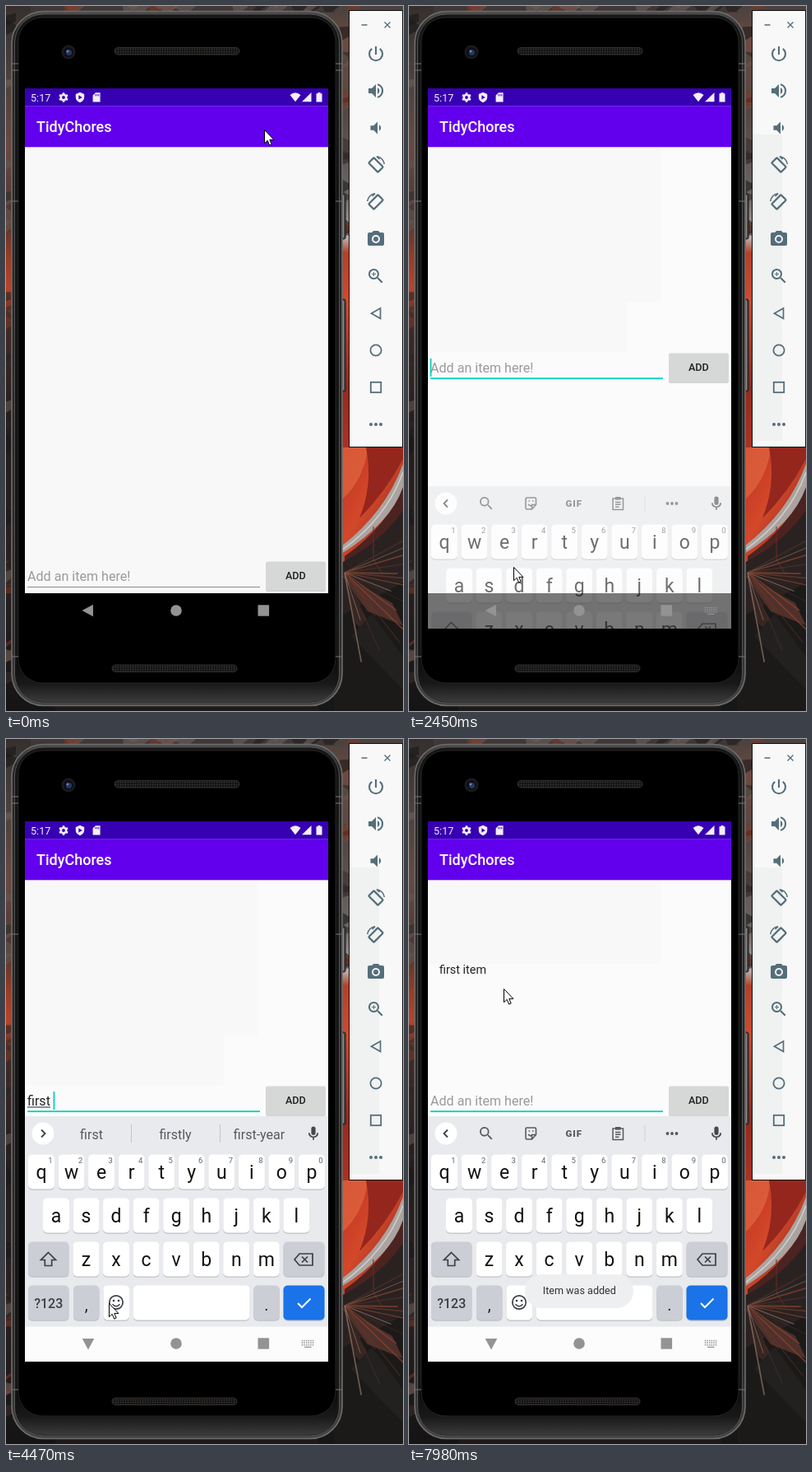
An HTML page for the animation above (8 s loop, 483 px wide and 856 px high).

```html
<!DOCTYPE html>
<html lang="en">
<head>
<meta charset="utf-8">
<title>To-do demo</title>
<style>
html, body { margin: 0; width: 100%; height: 100%; overflow: hidden; background: #1a1817; }
svg { display: block; width: 483px; height: 856px; font-family: Roboto, sans-serif; }
text { white-space: pre; }
</style>
</head>
<body>
<svg id="stage" viewBox="0 0 483 856" xmlns="http://www.w3.org/2000/svg"></svg>
<script>
const LOOP = 8000;
const INK = '#3c4043', SLATE = '#546e7a', TEAL = '#03d0bd';
const $ = id => document.getElementById(id);
const set = (id, attrs) => { for (const k in attrs) $(id).setAttribute(k, attrs[k]); };
const range = n => [...Array(n).keys()];

// Markup helpers
const rect = (x, y, w, h, fill, more = '') =>
  `<rect x="${x}" y="${y}" width="${w}" height="${h}" fill="${fill}" ${more}/>`;
const disc = (x, y, r, fill, more = '') =>
  `<circle cx="${x}" cy="${y}" r="${r}" fill="${fill}" ${more}/>`;
const path = (d, fill, more = '') => `<path d="${d}" fill="${fill}" ${more}/>`;
const line = (d, color, w, more = '') =>
  path(d, 'none', `stroke="${color}" stroke-width="${w}" ${more}`);
const text = (x, y, s, size, fill, more = '') =>
  `<text x="${x}" y="${y}" font-size="${size}" fill="${fill}" ${more}>${s}</text>`;
const mid = (x, y, s, size, fill, more = '') =>
  text(x, y, s, size, fill, 'text-anchor="middle" ' + more);
const at = (x, y, body, scale = 1) =>
  `<g transform="translate(${x} ${y}) scale(${scale})">${body}</g>`;
const group = (id, body, more = '') => `<g id="${id}" ${more}>${body}</g>`;
const fade = (id, stops, dir = 'x2="0" y2="1"') =>
  `<linearGradient id="${id}" x1="0" y1="0" ${dir}>` +
  stops.map(([o, c]) => `<stop offset="${o}" stop-color="${c}"/>`).join('') + '</linearGradient>';

let seed = 11;
const rnd = () => (seed = (seed * 16807) % 2147483647) / 2147483647;
const pick = list => list[Math.floor(rnd() * list.length)];

const defs = `<defs>
${fade('leftSide', [[0, '#35302e'], [.1, '#4b403b'], [.2, '#69493f'], [.3, '#4d3530'], [.36, '#9c3c23'],
  [.4, '#b6442a'], [.45, '#412a26'], [.6, '#241d1c'], [.8, '#2a211f'], [1, '#151414']])}
${fade('rightSide', [[0, '#49413f'], [.05, '#6d4a40'], [.15, '#544642'], [.27, '#6b6663'], [.33, '#b9aba4'],
  [.35, '#b63f28'], [.42, '#cf4a30'], [.54, '#942a20'], [.63, '#b03022'], [.75, '#8d281f'], [.79, '#2b2120'], [1, '#171616']])}
${fade('glow', [[0, '#b8301f'], [.45, '#d4482a'], [1, '#701f19']], 'x2="1" y2="1"')}
${fade('chin', [[0, '#0a0a0a'], [.6, '#191919'], [1, '#3a3a3a']])}
${fade('frame', [[0, '#4c4c4c'], [.03, '#262626'], [.9, '#2b2b2b'], [1, '#444']])}
<pattern id="mesh" width="3" height="3" patternUnits="userSpaceOnUse">
  <rect width="3" height="3" fill="#111"/><circle cx="1.5" cy="1.5" r=".9" fill="#3a3735"/></pattern>
<clipPath id="screenClip"><rect x="23" y="100" width="369" height="656"/></clipPath>
<clipPath id="corner"><rect x="400" y="536" width="83" height="320"/></clipPath>
</defs>`;

function wallpaper() {
  const shard = (x, w, y0, h) => {
    const y = y0 + rnd() * h;
    return path(`M${x} ${y}l${w} ${rnd() * 24 - 12}v${2 + rnd() * 9}l${-w} ${rnd() * 10}z`,
      pick(['#1b1817', '#2a2523', '#64574f', '#7b3323', '#3b2d29']), 'opacity=".6"');
  };
  const ray = i => {
    const a = -.55 + i * .125 + rnd() * .08, r = 60 + rnd() * 65;
    return line(`M412 688L${412 + r * Math.cos(a)} ${688 + r * Math.sin(a)}`,
      pick(['#6b3a2c', '#8d4632', '#4a3029', '#94786a']), .7 + rnd() * 1.2, 'opacity=".7"');
  };
  return rect(0, 0, 483, 856, '#1d1a19') +
    rect(0, 0, 60, 856, 'url(#leftSide)') + rect(380, 0, 103, 856, 'url(#rightSide)') +
    rect(30, 0, 370, 8, '#3f3836') +
    range(36).map(() => shard(0, 12, 0, 850)).join('') +
    range(16).map(() => shard(406, 14, 0, 300)).join('') +
    range(18).map(() => path(`M${20 + rnd() * 440} 0l${10 + rnd() * 20} 0l-9 7h-9z`,
      pick(['#211d1c', '#6d5f58', '#7a3a2b']), 'opacity=".6"')).join('') +
    `<g clip-path="url(#corner)">` +
    rect(400, 536, 83, 150, 'url(#glow)') +
    path('M405 536L440 536Q436 575 408 600z', '#e0653f', 'opacity=".75"') +
    path('M438 536h45v14Q462 590 430 622Q447 580 438 536z', '#94261d') +
    path('M483 582Q464 632 412 668V720H483z', '#4b2320') +
    path('M483 556Q462 614 408 656V665Q468 628 483 584z', '#aaa3a0') +
    line('M483 566Q463 622 408 661', '#d4cdca', 1.5) +
    path('M408 676Q458 650 483 612V856H400z', '#2a2221') +
    path('M408 740L483 700V856H400z', '#1c1a19') +
    path('M408 690L470 725L483 752L440 735z', '#50302a') +
    path('M412 700L458 775L425 750z', '#372622') +
    path('M420 765L445 738L483 790V830z', '#232120') +
    line('M447 632V672L458 690', '#6c2a22', 1) +
    range(16).map(ray).join('') + '</g>';
}

function phone() {
  const button = (y, h) => rect(407, y, 6, h, '#4b4b4b', 'rx="2" stroke="#1a1a1a"') +
    rect(410, y + 2, 1, h - 4, '#8b8b8b');
  const speaker = (x, y) => rect(x, y, 152, 8.5, 'url(#mesh)', 'rx="4.2" stroke="#34312f"');
  return button(228, 55) + button(356, 112) +
    rect(7, 6.5, 402, 843, 'url(#frame)', 'rx="39" stroke="#6d6d6d" stroke-width="1.6"') +
    rect(10.5, 10, 395, 836, '#161616', 'rx="35" stroke="#515151"') +
    path('M13 790V810Q13 845 48 845H368Q403 845 403 810V790z', 'url(#chin)') +
    rect(15, 14, 386, 808, '#000', 'rx="29" stroke="#242424"') +
    [70, 78, 237, 790].map(y => line(`M7 ${y}h8M401 ${y}h8`, '#777', 1)).join('') +
    speaker(132, 50.5) + speaker(129, 800) +
    disc(76, 56, 8.5, '#1b1b1d') + disc(76, 56, 6, '#0d0f18') +
    disc(76.5, 56.5, 3.6, '#25375f') + disc(75, 55, 1.4, '#6f86b8');
}

const searchIcon = 'M15.5 14h-.8l-.3-.3A6.5 6.5 0 1 0 13.7 14.4l.3.3v.8l5 5L20.5 19zM9.5 14a4.5 4.5 0 1 1 0-9a4.5 4.5 0 0 1 0 9z';
const micIcon = 'M12 14a3 3 0 0 0 3-3V5a3 3 0 0 0-6 0v6a3 3 0 0 0 3 3zM17 11a5 5 0 0 1-10 0H5a7 7 0 0 0 6 6.9V21h2v-3.1A7 7 0 0 0 19 11z';
const icon = (x, y, d, fill, s = 1) =>
  at(x - 12 * s, y - 12 * s, path(d, fill, 'fill-rule="evenodd"'), s);

function toolPanel() {
  const turn = flip => `<g transform="scale(${flip} 1)">` +
    rect(-4.5, -8, 9, 16, 'none', `rx="1" transform="rotate(-45)" stroke="${SLATE}" stroke-width="2.2"`) +
    line('M1 -10.2A10.5 10.5 0 0 1 10.3 -1M1 -10.4l3.5 3.4', SLATE, 1.6) + '</g>';
  const speaker = 'M3 9v6h4l5 5V4L7 9z';
  const near = 'M14 8v8a4.5 4.5 0 0 0 0-8z';
  const far = 'M14 3.2v2.1a7 7 0 0 1 0 13.4v2.1a9 9 0 0 0 0-17.6z';
  return rect(417.5, 5.5, 65, 530, '#f8f8f8', 'stroke="#111"') +
    group('tint', rect(418, 156, 36, 372, '#f0f1f1')) +
    line('M432.5 23h7M460.5 19.5l7 7m0-7l-7 7', SLATE, 1.4) +
    line('M450 49v10M445.2 51.8A8 8 0 1 0 454.8 51.8', SLATE, 2.1) +
    icon(450, 103, speaker + near + far, SLATE) +
    icon(452, 148, speaker + near, SLATE, .95) +
    at(450, 193, turn(1)) + at(450, 238, turn(-1)) +
    icon(450, 283, 'M9 2L7.2 4H4a2 2 0 0 0-2 2v12a2 2 0 0 0 2 2h16a2 2 0 0 0 2-2V6a2 2 0 0 0-2-2h-3.2L15 2zM12 17a5 5 0 1 1 0-10a5 5 0 0 1 0 10z', SLATE) +
    disc(450, 283, 3, SLATE) +
    icon(450, 328, searchIcon + 'M12 10h-2v2H9v-2H7V9h2V7h1v2h2z', SLATE) +
    line('M455.5 367v12.5L444.5 373.2z', SLATE, 1.7) +
    disc(450, 418, 6.6, 'none', `stroke="${SLATE}" stroke-width="1.8"`) +
    rect(443.8, 456.8, 12.4, 12.4, 'none', `stroke="${SLATE}" stroke-width="1.8"`) +
    [444, 450, 456].map(x => disc(x, 508, 2, SLATE)).join('');
}

function statusBar() {
  const w = '#f3eefb';
  return rect(23, 100, 369, 21.5, '#3700b3') + rect(23, 121.3, 369, 50, '#6200ee') +
    text(30, 115.5, '5:17', 12.6, w) +
    disc(70, 111, 3.2, 'none', `stroke="${w}" stroke-width="2.6"`) +
    range(6).map(i => rect(68.8, 105.2, 2.4, 2.6, w, `transform="rotate(${i * 60} 70 111)"`)).join('') +
    path('M90 104.8l5.2 2.2v3.6q0 4.8-5.2 6.6q-5.2-1.8-5.2-6.6V107z', w) +
    path('M88.4 108.3l4.4 2.6l-4.4 2.6z', '#3700b3') +
    path('M109 105.2h5.6v11.4h-9v-8z', w) +
    line('M108.8 107v2.4M110.8 107v2.4M112.8 107v2.4', '#3700b3', .9) +
    path('M345.5 108Q352 102.5 358.5 108L352 116.2z', w) +
    path('M371.5 105v11.2H360z', w) + path('M379.5 105h3v1.2h2v10.4h-7v-10.4h2z', w) +
    text(37, 153, 'TidyChores', 18, '#fff', 'font-weight="500"');
}

function inputRow() {
  return text(26, 698, '', 16.1, '#9a9a9a', 'id="field"') +
    rect(26, 699.5, 0, 1, '#222', 'id="under"') +
    rect(26, 705, 283, 1, '#8c8c8c', 'id="rule"') +
    rect(26, 681, 1.8, 22, TEAL, 'id="caret"') +
    rect(316, 676, 73, 35, '#000', 'rx="2" opacity=".16"') +
    rect(316, 674.5, 73, 35, '#d6d8d7', 'rx="2" id="button"') +
    mid(352.3, 696.2, 'ADD', 12.6, '#222', 'font-weight="500"');
}

function keyboard() {
  const PITCH = 36.55;
  const key = (x, y, w, fill = '#fff') =>
    rect(x, y + 1.3, w, 42, '#bfc2c6', 'rx="5"') + rect(x, y, w, 42, fill, 'rx="5"');
  const letters = (s, first, y) => [...s].map((c, i) => {
    const x = first + i * PITCH;
    return key(x - 16, y, 32) + mid(x, y + 29, c, 23, '#111');
  }).join('');
  const gray = '#cbced4';
  const chevron = d => disc(45, 479, 13.5, '#fff') + line(d, INK, 1.8);
  const tools = chevron('M47 474.5l-4.5 4.5l4.5 4.5') +
    icon(94, 479, searchIcon, '#55595e', .88) +
    line('M142 473.5q0-1.5 1.5-1.5h9.5q1.5 0 1.5 1.5v7l-5 5.5h-6q-1.5 0-1.5-1.5zM154.5 480.5h-5v5.5M145 480q3 3.2 5.5 .4M145.6 476h1.5M150 476h1.5', '#55595e', 1.6) +
    mid(200.8, 483, 'GIF', 11.5, '#55595e', 'font-weight="900" letter-spacing="1"') +
    line('M248 473h12.5v13.5H248zM251 477.5h6.5M251 480.3h6.5M251 483.2h4.5', '#55595e', 1.5) +
    rect(251, 471, 6.5, 3.6, '#55595e') + line('M287 469v20', '#cdd0d4', 1) +
    [314.5, 320, 325.5].map(x => disc(x, 479, 1.9, '#55595e')).join('');
  const words = chevron('M43 474.5l4.5 4.5l-4.5 4.5') +
    line('M152.5 468v22M260.5 468v22', '#c3c6ca', 1) +
    [104, 206, 308].map((x, i) => mid(x, 485.5, '', 16, '#55595e', `id="word${i}"`)).join('');
  const digits = range(10).map(i =>
    mid(43 + i * PITCH + 11, 515.3, (i + 1) % 10, 9.5, '#5f6368')).join('');
  return rect(23, 458, 369, 256, '#e8eaed') + rect(23, 713.5, 369, 260, '#fcfcfc') +
    group('tools', tools) + group('words', words) + icon(374, 479, micIcon, '#45494d', .86) +
    letters('qwertyuiop', 43, 504.5) + digits +
    letters('asdfghjkl', 61, 557.5) + letters('zxcvbnm', 97.5, 610.5) +
    key(27, 610.5, 49.5, gray) + line('M51.5 623.5l9 9h-4.8v7h-8.4v-7h-4.8z', INK, 1.7) +
    key(337.5, 610.5, 50, gray) +
    line('M357 625h16v14h-16l-6-7zM360 628.5l7 7m0-7l-7 7', INK, 1.7) +
    key(27, 663.5, 49.5, gray) + mid(51.7, 690.5, '?123', 16, INK, 'font-weight="500"') +
    key(82, 663.5, 31.5, gray) + mid(97.7, 693.5, ',', 20, '#222') +
    key(118.5, 663.5, 31.5) + disc(134, 684, 8.2, 'none', `stroke="${INK}" stroke-width="1.7"`) +
    disc(131, 682, 1.3, INK) + disc(137, 682, 1.3, INK) + line('M129.5 686.2q4.5 5 9 0', INK, 1.6) +
    key(155, 663.5, 141.5) +
    key(301.3, 663.5, 31.5, gray) + mid(317, 693.5, '.', 20, '#222') +
    key(337.5, 663.5, 50, '#1a73e8') + line('M355 685l5 5l10.5-10.5', '#fff', 2);
}

function navBar() {
  const c = '#939393';
  return rect(23, 713, 369, 43, '#000', 'id="navShade"') +
    path('M92.5 734l13.5-7.3v14.6z', c, 'id="back"') +
    disc(207, 734, 6.8, c) + rect(306.5, 727.3, 13.6, 13.4, c) +
    group('imeIcon', range(18).map(i =>
      rect(359.8 + i % 6 * 2.6, 729.8 + Math.floor(i / 6) * 2.6, 1.5, 1.5, c)).join('') +
      rect(363, 737.8, 8.5, 1.2, c));
}

$('stage').innerHTML = defs + wallpaper() + phone() + toolPanel() +
  `<g clip-path="url(#screenClip)">` +
  rect(23, 100, 369, 656, '#f8f8f8', 'id="page"') +
  group('shade', rect(23, 172, 283, 188, '#f8f8f8', 'id="shadeTop"') +
    rect(23, 360, 242, 60, '#f8f8f8', 'id="shadeLow"')) +
  statusBar() +
  text(37, 284.5, 'first item', 14.4, '#222', 'id="item"') +
  group('row', inputRow()) + group('keys', keyboard()) + navBar() +
  group('toast', rect(141, 650, 132, 41, '#eeeff0', 'rx="20.5"') +
    mid(207.3, 674, 'Item was added', 12.6, '#333', 'id="toastText"')) + '</g>' +
  group('mouse', path('M0 0V16.2L3.7 12.8L6.2 18.6L8.7 17.5L6.3 11.9H11.4z', '#fff',
    'stroke="#000" stroke-width="1" stroke-linejoin="round"'));

const pen = document.createElement('canvas').getContext('2d');
pen.font = '16.1px Roboto, sans-serif';
const width = s => pen.measureText(s).width;

const pointer = [
  [0, 314, 150], [1340, 306, 156], [1490, 292, 200], [1610, 268, 295], [1760, 232, 430],
  [1880, 185, 570], [2030, 143, 672], [2150, 129, 682], [2300, 127, 681], [2570, 126, 683],
  [2720, 125, 685], [5530, 182, 570], [5680, 245, 434], [5800, 294, 429], [5950, 334, 433],
  [6070, 344, 435], [6340, 330, 437], [6490, 292, 440], [6640, 262, 444], [6770, 235, 447],
  [6900, 205, 448], [7040, 180, 447], [7710, 164, 412], [7850, 134, 348], [7980, 115, 303]];
const typing = [
  [0, ''], [3640, 'f', 'f for from'], [3790, 'fi', 'fi find first'], [3910, 'fir', 'fir first fire'],
  [4060, 'firs', 'firs first fits'], [4190, 'first', 'firs first firsts'],
  [4470, 'first ', 'first firstly first-year'], [4590, 'first i', 'i in is'],
  [4720, 'first it', 'it its item'], [4860, 'first ite', 'ite item its'],
  [4980, 'first item', 'ite item items'], [5260, 'first item', 'item items itemized'], [6220, '']];
// offset and opacity of the keyboard, darkness of the bar below, turn of the back arrow
const slide = [[0, 300, 0, 1, 0], [2450, 125, .6, .52, 0], [2570, 32, .9, .16, -50], [2720, 0, 1, 0, -90]];
const toast = [[0, 0, 0], [6340, .55, .4], [6490, 1, .7], [6640, 1, 1]];
const caretOn = [[2300, 2840], [3370, 5530], [6220, 6900], [7310, 7710]];

const held = (steps, t) => steps.filter(s => s[0] <= t).pop();
const within = (t, a, b) => t >= a && t < b;
const show = (id, on) => { $(id).style.display = on ? '' : 'none'; };

function render(t) {
  const [, mx, my] = held(pointer, t);
  set('mouse', { transform: `translate(${mx + .5} ${my + .5})` });

  const focus = t >= 2300, open = t >= 2450, added = t >= 6220;
  set('page', { fill: open ? '#fbfbfb' : '#f8f8f8' });
  set('row', { transform: `translate(0 ${open ? -253 : 0})` });
  set('rule', { fill: focus ? TEAL : '#8c8c8c', y: focus ? 704.3 : 705, height: focus ? 1.8 : 1 });
  set('button', { fill: within(t, 6070, 6340) ? '#c5c8c7' : '#d6d8d7' });
  set('shadeTop', { height: added ? 101 : 188 });
  show('shade', open);
  show('shadeLow', !added);
  show('tint', focus);
  show('item', added);

  const [typedAt, typed, hints] = held(typing, t);
  $('field').textContent = typed || 'Add an item here!';
  set('field', { fill: typed ? '#222' : '#9a9a9a' });
  const start = typed.length > 6 ? 6 : 0;
  const from = width(typed.slice(0, start));
  const marked = typedAt === 4980 ? 'ite' : typed.slice(start).trim();
  set('under', { x: 26 + from, width: typed ? width(marked) : 0 });
  set('caret', { x: 25.6 + width(typed) });
  show('caret', caretOn.some(([a, b]) => within(t, a, b)));

  show('tools', !hints);
  show('words', hints);
  if (hints) hints.split(' ').forEach((w, i) => { $('word' + i).textContent = w; });

  const [, drop, alpha, dark, turn] = held(slide, t);
  set('keys', { transform: `translate(0 ${drop})`, opacity: alpha });
  set('navShade', { opacity: dark });
  set('back', { transform: `rotate(${turn} 100 734)` });
  show('imeIcon', open);

  const [, bubble, label] = held(toast, t);
  set('toast', { opacity: bubble });
  set('toastText', { opacity: label });
}

const begin = performance.now();
function tick() {
  render((performance.now() - begin) % LOOP);
  requestAnimationFrame(tick);
}
tick();
</script>
</body>
</html>
```
